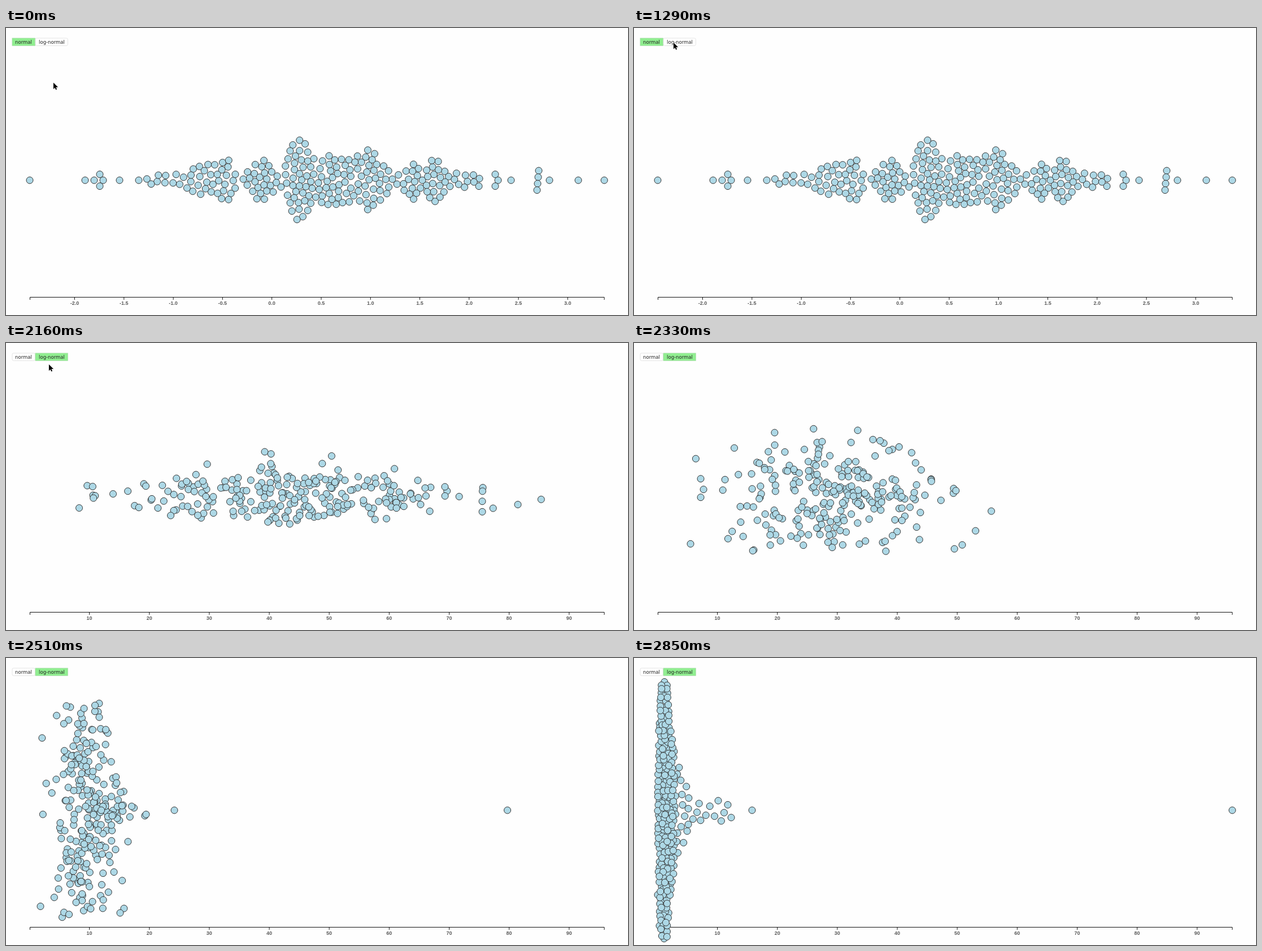
An HTML page for the animation above (4.13 s loop, 1101x509 px).

```html
<!DOCTYPE html>
<html lang="en">
<head>
<meta charset="utf-8">
<title>Beeswarm transition</title>
<style>
  html, body { margin: 0; width: 100%; height: 100%; overflow: hidden; background: #fefefe; }
  svg { display: block; width: 1101px; height: 509px; }
  .dots circle { fill: #add8e6; stroke: #333; stroke-width: 1; }
  .axis path { fill: none; stroke: #111; }
  .axis text { font: bold 9px "Liberation Sans", Arial, sans-serif; fill: #5c5c5c; text-anchor: middle; }
  .button text { font: 8.5px "DejaVu Sans", Verdana, sans-serif; fill: #222; text-anchor: middle; }
  .button rect { fill: #fff; stroke: #ddd; stroke-width: .8; }
  .button.down rect { fill: #efefef; }
  .button.on rect { fill: #90ee90; stroke: #a8dca8; rx: 0; }
  .cursor { fill: #000; stroke: #fff; stroke-width: .9; paint-order: stroke; filter: drop-shadow(0 .8px .6px rgba(0,0,0,.3)); }
</style>
</head>
<body>
<svg viewBox="0 0 1101 509">
  <g class="axis" id="linear"></g>
  <g class="axis" id="log"></g>
  <g class="button" id="normalButton"><rect x="11" y="18" width="40.5" height="13.3" rx="2.5"/><text x="31" y="27.7">normal</text></g>
  <g class="button" id="logButton"><rect x="52" y="18" width="57.3" height="13.3" rx="2.5"/><text x="81" y="27.7">log-normal</text></g>
  <g class="dots" id="dots"></g>
  <path class="cursor" id="cursor" d="M0 0V11.2L2.6 8.8L4.2 12.6L6 11.8L4.4 8.1H8Z"/>
</svg>
<script>
const LOOP = 4130, COUNT = 250, MID = 270, REACH = 230;
const $ = id => document.getElementById(id);

let seed = 11;
function random() {
  seed = seed + 0x6D2B79F5 | 0;
  let t = Math.imul(seed ^ seed >>> 15, 1 | seed);
  t = t + Math.imul(t ^ t >>> 7, 61 | t) ^ t;
  return ((t ^ t >>> 14) >>> 0) / 4294967296;
}
const between = (a, b) => a + random() * (b - a);

// Throw points into a shape, with a gap that slowly shrinks
function fill(points, [x0, x1, reach], inside, gap) {
  const tries = 60000;
  for (let i = 0; i < tries && points.length < COUNT; i++) {
    const x = between(x0, x1), dy = between(-reach, reach);
    if (!inside(x, Math.abs(dy))) continue;
    const y = MID + dy, d = gap(x, i / tries);
    if (points.every(p => Math.hypot(p[0] - x, p[1] - y) >= d)) points.push([x, y]);
  }
  return points;
}

// Push overlapping points apart, leaving the first few in place
function relax(points, fixed, gap) {
  for (let pass = 0; pass < 40; pass++) {
    points.forEach((p, i) => {
      for (let j = 0; j < i; j++) {
        const q = points[j], dx = p[0] - q[0], dy = p[1] - q[1];
        const d = Math.hypot(dx, dy), push = (gap - d) / d / 2;
        if (push <= 0) continue;
        if (i >= fixed) { p[0] += dx * push; p[1] += dy * push; }
        if (j >= fixed) { q[0] -= dx * push; q[1] -= dy * push; }
      }
    });
  }
}

// Points that travel alone: start x, end x, end y
const loners = [[42, 1059, MID], [140, 45, 475], [1059, 45, 337], [1013, 42, 420], [737, 209, MID]];

// Normal swarm: single points, a column, and a body with a given half height
const singles = [156, 172, 201, 235, 871, 894, 962].map(x => [x, MID]);
const forks = [166, 866].flatMap(x => [[x, MID - 10.5], [x, MID + 10.5]]);
const column = [0, 1, 2, 3].map(i => [943 - i, MID - 17 + 11.5 * i]);
const body = [
  [248, 5], [282, 12], [312, 12], [345, 27], [395, 36], [407, 12], [409, -1], [419, -1], [421, 12],
  [452, 40], [478, 18], [490, 10], [505, 61], [524, 78], [550, 36], [575, 46], [602, 38], [645, 56],
  [672, 26], [690, 8], [720, 34], [740, 12], [758, 44], [785, 15], [844, 9]];

function halfHeight(x) {
  const i = Math.max(1, body.findIndex(k => k[0] >= x));
  const [a, h] = body[i - 1], [b, g] = body[i];
  return h + (g - h) * (x - a) / (b - a);
}

const start0 = [...loners.map(l => [l[0], MID]), ...singles, ...forks, ...column];
const fixed = start0.length;
const from = fill(start0, [248, 844, 78], (x, dy) => dy <= halfHeight(x), (x, k) => 11.8 - 4 * k);
relax(from, fixed, 11.5);

// Log-normal swarm: a tall pillar, a bulge in the middle and a thin tail
function inPillar(x, dy) {
  const d = dy / REACH;
  if (x < 42 + 7 * d ** 3) return false;
  return x < 58 + 8 * (1 - d * d) + 36 * Math.exp(-((dy / 85) ** 2)) || dy < 20;
}
const to = fill(
  loners.map(l => l.slice(1)), [42, 178, REACH], inPillar,
  (x, k) => x > 71 ? 11 + (x - 71) * .04 : 9 - 5 * k);

for (let i = to.length - 1; i > loners.length; i--) {
  const j = Math.floor(between(loners.length, i + 1));
  [to[i], to[j]] = [to[j], to[i]];
}

function drawAxis(group, first, step, labels) {
  let d = "M42.5 482V477.5H1059V482", text = "";
  labels.forEach((label, i) => {
    const x = (first + i * step).toFixed(1);
    d += `M${x} 477.5V482`;
    text += `<text x="${x}" y="490.8">${label}</text>`;
  });
  group.innerHTML = `<path d="${d}"/>${text}`;
}
drawAxis($("linear"), 121.5, 87.28, Array.from({ length: 11 }, (_, i) => (i / 2 - 2).toFixed(1)));
drawAxis($("log"), 147.5, 106.16, Array.from({ length: 9 }, (_, i) => 10 * (i + 1)));

const size = Math.min(from.length, to.length);
$("dots").innerHTML = "<circle r='6'/>".repeat(size);
const dots = [...$("dots").children];

const ticks = Array.from({ length: 9 }, (_, k) => 2160 + 10 * Math.round(8.65 * k));
const pointer = [
  [0, 84, 97], [630, 84, 95.3], [750, 80, 55], [840, 75, 14], [1020, 71, 22],
  [1110, 70, 25], [1290, 70, 26], [2160, 76, 38], [2250, -50, -50]];

const ease = t => t < .5 ? 4 * t ** 3 : 1 - 4 * (1 - t) ** 3;

let shown = -1;
function placeDots(p) {
  if (p === shown) return;
  shown = p;
  for (let i = 0; i < size; i++) {
    const [x, y] = from[i], [u, v] = to[i];
    dots[i].setAttribute("cx", (x + (u - x) * p).toFixed(2));
    dots[i].setAttribute("cy", (y + (v - y) * p).toFixed(2));
  }
}

function render(t) {
  const tick = ticks.findLast(k => k <= t);
  placeDots(tick ? ease(Math.min(1, (tick - 1858) / 1000)) : 0);
  $("linear").style.display = tick ? "none" : "";
  $("log").style.display = tick ? "" : "none";
  $("normalButton").classList.toggle("on", t < 1920);
  $("logButton").classList.toggle("down", t >= 1740 && t < 1920);
  $("logButton").classList.toggle("on", t >= 1920);
  const [, x, y] = pointer.findLast(k => k[0] <= t);
  $("cursor").setAttribute("transform", `translate(${x} ${y})`);
}

const start = performance.now();
function loop() {
  render((performance.now() - start) % LOOP);
  requestAnimationFrame(loop);
}
loop();
</script>
</body>
</html>
```
